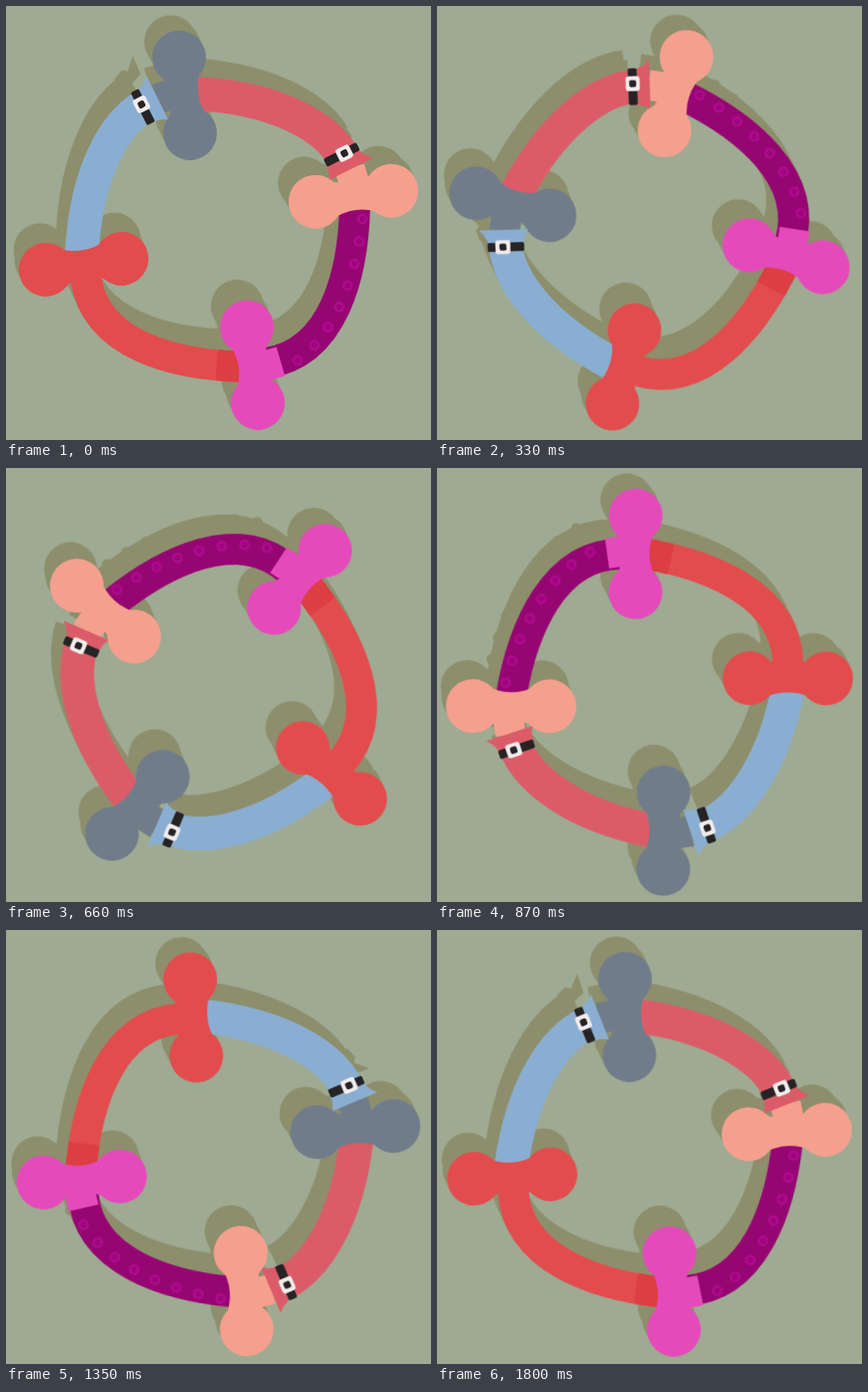
An HTML page that plays this animation: 427x436 px, repeating every 1.83 s.

```html
<!DOCTYPE html>
<html lang="en">
<head>
<meta charset="utf-8">
<title>Ring of limbs</title>
<style>
  html, body { margin: 0; width: 100%; height: 100%; overflow: hidden; background: #9eaa92; }
  svg { display: block; width: 100%; height: 100%; }
  .spin { transform-origin: 213.5px 225.3px; animation: spin 1830ms steps(61) infinite; }
  @keyframes spin { to { transform: rotate(-361deg); } }
  .line { fill: none; stroke: currentColor; }
  .dots { fill: none; stroke-linecap: round; stroke-dasharray: 0 1; }
  .grey { color: #717c8a; }
  .blue { color: #8aaed1; }
  .coral { color: #db5c68; }
  .peach { color: #f5a08e; }
  .red { color: #e24c4d; }
  .cuff { color: #dc3e41; }
  .pink { color: #e54abb; }
  .purple { color: #960672; }
</style>
</head>
<body>
<svg viewBox="0 0 427 436">
  <defs>
    <filter id="shade" color-interpolation-filters="sRGB">
      <feFlood flood-color="#8d8e6c"/>
      <feComposite in2="SourceAlpha" operator="in"/>
    </filter>

    <!-- Every part is drawn at the top of the ring, then turned by quarters -->
    <g id="joint" transform="translate(179.4 89.8) rotate(-8.2)" fill="currentColor">
      <circle cy="-38.5" r="27"/>
      <circle cy="38.5" r="27"/>
      <path d="M-18 -20Q-10 0 -18 20H18Q10 0 18 -20Z"/>
    </g>
    <path id="stub" class="line" stroke-width="30.5" d="M180 85L151 93.5"/>
    <path id="sleeve" class="line" stroke-width="34" d="M138 101C110 118 80 165 76 252"/>
    <path id="limb" class="line" stroke-width="31" d="M174 90.6L165 92C98 102 78 181 76.5 250"/>
    <path id="band" class="line" stroke-width="31" d="M78 223.5L76.3 250"/>
    <path id="dotLine" pathLength="7.01" d="M134 94.5C102 117 76 170 69 237"/>
    <g id="trim">
      <path fill="currentColor" d="M141 70L163 114Q154 113 146 118L128 88Q138 82 141 70Z"/>
      <g transform="translate(137.5 101.5) rotate(-27)">
        <rect x="-4.5" y="-18.5" width="9" height="37" rx="2" fill="#262324"/>
        <rect x="-7" y="-10.5" width="14" height="15" rx="3" fill="#f1ecec"/>
        <rect x="-3.5" y="-6.5" width="7" height="7" rx="2" fill="#262324"/>
      </g>
    </g>

    <g id="arms">
      <use href="#sleeve" class="blue"/>
      <use href="#sleeve" class="coral" transform="rotate(90 213.5 225.3)"/>
      <g transform="rotate(-90 213.5 225.3)">
        <use href="#limb" class="red"/>
        <use href="#band" class="cuff"/>
      </g>
      <g transform="rotate(180 213.5 225.3)">
        <use href="#limb" class="purple"/>
        <g class="dots">
          <use href="#dotLine" stroke="#ad0a8c" stroke-width="11"/>
          <use href="#dotLine" stroke="#930571" stroke-width="5"/>
          <use href="#dotLine" stroke="#ad0a8c" stroke-width="2"/>
        </g>
      </g>
    </g>
    <g id="body">
      <use href="#arms"/>
      <use href="#joint" class="red" transform="rotate(-90 213.5 225.3)"/>
      <g class="grey">
        <use href="#stub"/>
        <use href="#joint"/>
      </g>
      <g class="pink" transform="rotate(180 213.5 225.3)">
        <use href="#stub"/>
        <use href="#joint"/>
      </g>
      <g class="peach" transform="rotate(90 213.5 225.3)">
        <use href="#stub"/>
        <use href="#joint"/>
      </g>
    </g>
  </defs>

  <rect width="427" height="436" fill="#9eaa92"/>

  <g filter="url(#shade)">
    <g transform="translate(204.2 205.9) scale(.98) translate(-213.5 -225.3)">
      <g class="spin">
        <use href="#body"/>
        <path d="M116 90L124 81L130 82L135 66L143 85L130 100Z"/>
        <g transform="translate(213.5 225.3) scale(1.02) translate(-213.5 -225.3)">
          <use href="#arms"/>
          <g class="dots" transform="rotate(180 213.5 225.3) translate(-5 -3.5)">
            <use href="#dotLine" stroke="#000" stroke-width="11"/>
          </g>
        </g>
      </g>
    </g>
    <!-- Fills the notch between each shape and its shadow -->
    <g transform="translate(-4.6 -9.7)">
      <use href="#body" class="spin"/>
    </g>
  </g>

  <g class="spin">
    <use href="#body"/>
    <use href="#trim" class="blue"/>
    <use href="#trim" class="coral" transform="rotate(90 213.5 225.3)"/>
  </g>
</svg>
</body>
</html>
```
